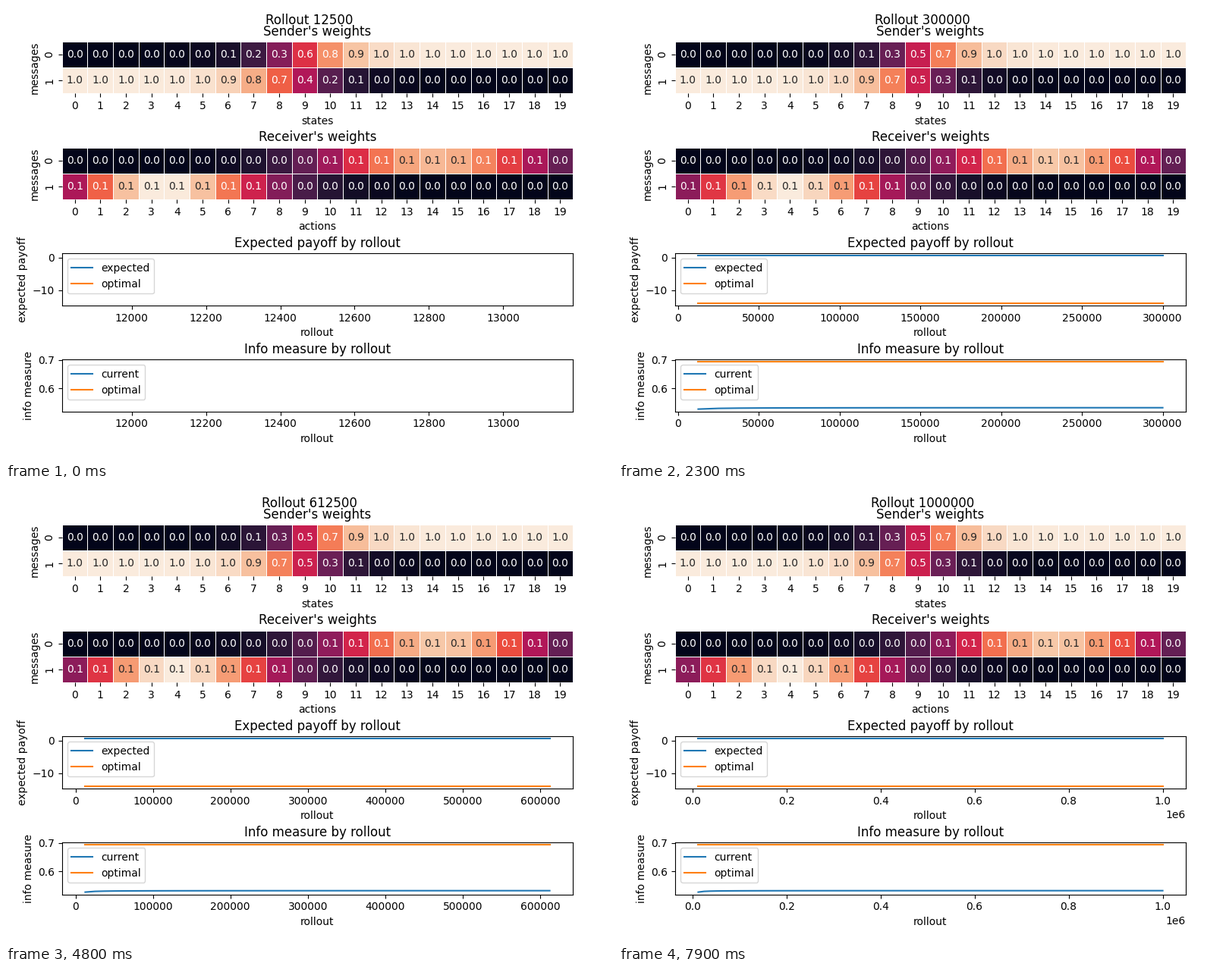
Recreate the animation shown at these times as a matplotlib script. Size 800 by 600 pixels, loop 8 s.

```python
import numpy as np
import matplotlib.pyplot as plt
from matplotlib.animation import FuncAnimation
from matplotlib.colors import LinearSegmentedColormap

FRAMES, STEP, N = 80, 12500, 20
LEFT, WIDTH, HEIGHT = 73.805, 673.37, 68.6
TOP, PITCH = 46.85, 139.75
PEAK = 0.147  # largest receiver weight

plt.rcParams.update({"font.family": "DejaVu Sans", "font.size": 10})

# Evenly spaced stops from dark violet to cream.
ROCKET = LinearSegmentedColormap.from_list(
    "rocket", ("#03051a #221331 #451c47 #6a1f56 #921c5b #b91657 "
               "#d92847 #ed503e #f47d57 #f6a47c #f7c9aa #faebdd").split())


def settle(start, end, n):
    """Learning closes in on its end value as one over the number of updates."""
    start, end = np.asarray(start), np.asarray(end)
    return end + (start - end) / n


def sender_weights(n):
    slope, centre = settle((0.95, 8.72), (1.0, 9.03), n)
    p = 1 / (1 + np.exp(-slope * (np.arange(N) - centre)))
    return np.array([p, 1 - p])


def bump(height, centre, outer, inner, side):
    """Bell with its own width on the flank facing the border (side is +1 or -1)."""
    d = side * (np.arange(N) - centre)
    flank = np.where(d > 0, np.abs(d / outer) ** 2.2, (d / inner) ** 2)
    return height * np.exp(-flank / 2)


def receiver_weights(n):
    right = settle((0.855, 14.05, 3.35, 3.25), (0.91, 14.3, 3.1, 3.15), n)
    left = settle((1, 3.45, 2.68, 3.05), (1, 4, 2.85, 3), n)
    return PEAK * np.array([bump(*right, side=1), bump(*left, side=-1)])


def text_color(rgba):
    rgb = np.asarray(rgba[:3])
    linear = np.where(rgb <= .03928, rgb / 12.92, ((rgb + .055) / 1.055) ** 2.4)
    return ".15" if linear @ [.2126, .7152, .0722] > .408 else "w"


class Heatmap:
    def __init__(self, ax, title, xlabel):
        self.mesh = ax.pcolormesh(np.zeros((2, N)), cmap=ROCKET,
                                  linewidths=0.5, edgecolors="white")
        ax.set(xlim=(0, N), ylim=(2, 0), title=title, xlabel=xlabel, ylabel="messages")
        ax.set_xticks(np.arange(N) + .5, range(N))
        ax.set_yticks([.5, 1.5], [0, 1], rotation="vertical", va="center")
        ax.spines[:].set_visible(False)
        self.labels = [ax.text(c + .5, r + .5, "", ha="center", va="center")
                       for r in range(2) for c in range(N)]

    def update(self, weights):
        self.mesh.set_array(weights)
        self.mesh.set_clim(weights.min(), weights.max())
        values = weights.ravel()
        for label, value, rgba in zip(self.labels, values, ROCKET(self.mesh.norm(values))):
            label.set_text(f"{value:.1f}")
            label.set_color(text_color(rgba))


class Chart:
    def __init__(self, ax, title, ylabel, names):
        self.ax = ax
        self.lines = [ax.plot([], [], label=name)[0] for name in names]
        ax.set(title=title, xlabel="rollout", ylabel=ylabel)
        ax.legend(loc="upper left")

    def update(self, x, *series):
        for line, y in zip(self.lines, series):
            line.set_data(x, y)
        self.ax.relim()
        self.ax.autoscale(True)
        self.ax.autoscale_view()


fig = plt.figure(figsize=(8, 6), dpi=100)
axes = [fig.add_axes([LEFT / 800, 1 - (TOP + k * PITCH + HEIGHT) / 600,
                      WIDTH / 800, HEIGHT / 600]) for k in range(4)]
heading = fig.suptitle("", y=1 - 10 / 600)
sender = Heatmap(axes[0], "Sender's weights", "states")
receiver = Heatmap(axes[1], "Receiver's weights", "actions")
payoff = Chart(axes[2], "Expected payoff by rollout", "expected payoff",
               ("expected", "optimal"))
info = Chart(axes[3], "Info measure by rollout", "info measure",
             ("current", "optimal"))


def update(i):
    counts = np.arange(1, i + 2)
    rollouts = STEP * counts
    heading.set_text(f"Rollout {rollouts[-1]}")
    sender.update(sender_weights(i + 1))
    receiver.update(receiver_weights(i + 1))
    payoff.update(rollouts, np.full(i + 1, 0.5), np.full(i + 1, -14.0))
    info.update(rollouts, settle(0.5268, 0.532, counts), np.full(i + 1, np.log(2)))


anim = FuncAnimation(fig, update, frames=FRAMES, interval=100, repeat=True, repeat_delay=0)
plt.show()
```
